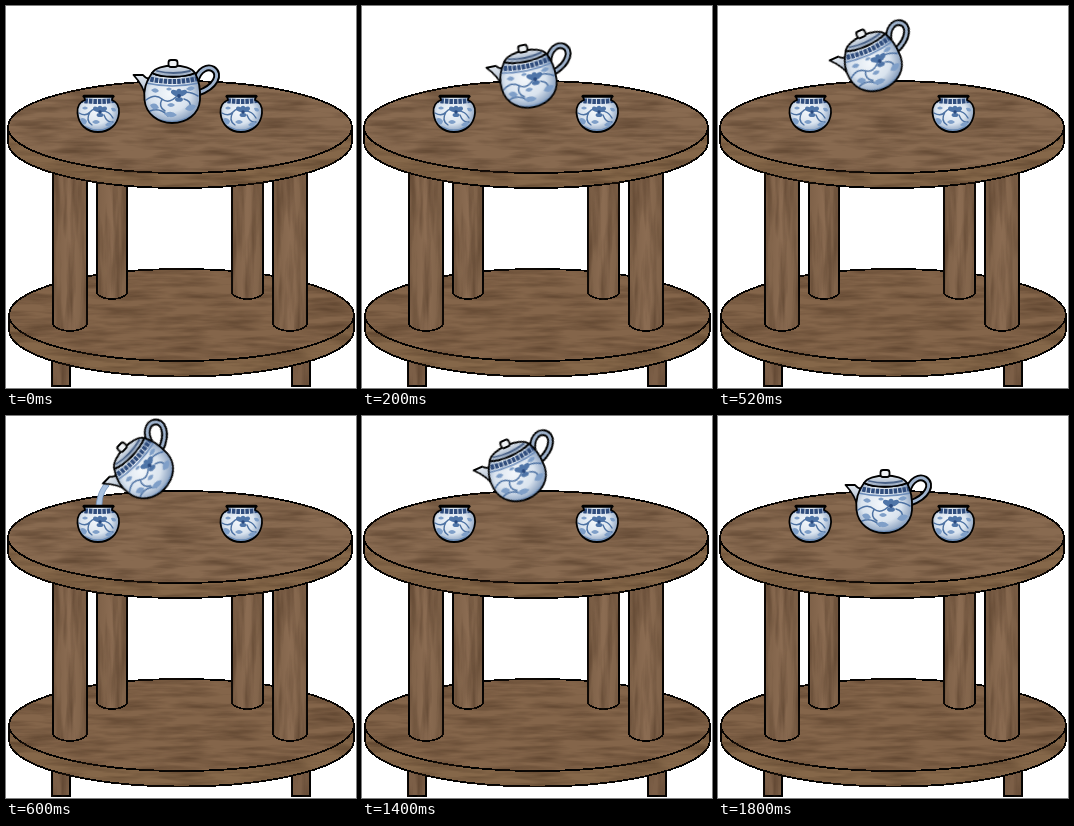
Recreate the animation shown at these times as an HTML page. Size 350x382 px, loop 2 s.

```html
<!DOCTYPE html>
<html lang="en">
<head>
<meta charset="utf-8">
<title>Tea table</title>
<style>
  html, body { margin: 0; width: 100%; height: 100%; overflow: hidden; background: #fff; }
  svg { display: block; width: 350px; height: 382px; }
  .ink { stroke: #000; stroke-width: 1.8; stroke-linejoin: round; stroke-linecap: round; }
  .wood { shape-rendering: crispEdges; }
  .line { fill: none; stroke-linecap: round; stroke-linejoin: round; }
  .band { fill: none; stroke: #2f4c7c; stroke-width: 5; stroke-dasharray: 3.5 1; }
  #pot { animation: pour 2s step-end infinite; }
  #stream { animation: flow 2s step-end infinite; }
  @keyframes pour {
    0%, 90%, 100% { transform: translate(166px, 90px); }
    10%, 80% { transform: translate(166.3px, 74.7px) rotate(-11.5deg); }
    20%, 70% { transform: translate(155.3px, 58px) rotate(-24deg); }
    30% { transform: translate(138.7px, 54.5px) rotate(-46deg); }
  }
  @keyframes flow {
    0%, 70%, 100% { visibility: hidden; }
    30% { visibility: visible; }
  }
</style>
</head>
<body>
<svg viewBox="0 0 350 382">
  <defs>
    <filter id="grainX" x="-.02" y="-.04" width="1.04" height="1.08" color-interpolation-filters="sRGB">
      <feTurbulence type="fractalNoise" baseFrequency=".02 .16" numOctaves="3" seed="4"/>
      <feColorMatrix values="0 0 0 0 .22  0 0 0 0 .14  0 0 0 0 .08  .9 0 0 0 -.34"/>
      <feComposite in2="SourceAlpha" operator="in" result="grain"/>
      <feMerge><feMergeNode in="SourceGraphic"/><feMergeNode in="grain"/></feMerge>
    </filter>
    <filter id="grainY" x="-.02" y="-.08" width="1.04" height="1.16" color-interpolation-filters="sRGB">
      <feTurbulence type="fractalNoise" baseFrequency=".13 .014" numOctaves="3" seed="9"/>
      <feColorMatrix values="0 0 0 0 .22  0 0 0 0 .14  0 0 0 0 .08  .9 0 0 0 -.34"/>
      <feComposite in2="SourceAlpha" operator="in" result="grain"/>
      <feMerge><feMergeNode in="SourceGraphic"/><feMergeNode in="grain"/></feMerge>
    </filter>
    <linearGradient id="leg">
      <stop offset="0" stop-color="#7e6148"/>
      <stop offset=".5" stop-color="#8b6c52"/>
      <stop offset="1" stop-color="#7e6148"/>
    </linearGradient>
    <radialGradient id="china" cx=".45" cy=".42" r=".6">
      <stop offset="0" stop-color="#f3f7fb"/>
      <stop offset=".6" stop-color="#d9e3ee"/>
      <stop offset="1" stop-color="#7f98ba"/>
    </radialGradient>
    <linearGradient id="glaze" x2="0" y2="1">
      <stop offset="0" stop-color="#e3e9f0"/>
      <stop offset="1" stop-color="#93a5bd"/>
    </linearGradient>

    <g id="flower">
      <g fill="#4f75a8">
        <ellipse cx="-4" cy="-1" rx="4" ry="2.3" transform="rotate(25)"/>
        <ellipse cx="4" cy="-1" rx="4" ry="2.3" transform="rotate(-25)"/>
        <ellipse cy="-3" rx="2.4" ry="3.3"/>
        <ellipse cy="3" rx="3.4" ry="2"/>
      </g>
      <circle r="1.7" fill="#28497f"/>
    </g>

    <path id="cupBody" d="M78 90 H107 L106 94 C111 96 113.5 101 113 107 C112 119 103 126 92 126 C81 126 72.500 119 71.500 107 C71 101 73.500 96 79 94 Z"/>
    <clipPath id="inCup"><use href="#cupBody"/></clipPath>
    <g id="cup">
      <use href="#cupBody" fill="url(#china)"/>
      <g clip-path="url(#inCup)">
        <path d="M74 94 Q92 97 111 94" class="band"/>
        <path d="M73 107 Q80 111 84 106 T94 105 Q103 104 107 112 M84 106 Q79 115 86 119 M98 109 Q101 117 107 116" class="line" stroke="#4d72a3" stroke-width="1.400"/>
        <path d="M74 113 q4 -3 7 2 q-1 5 -5 3 z M99 119 q4 -5 8 -2 q-3 6 -8 2 z M105 102 q5 -1 5 3 q-4 2 -5 -3 z M76 102 q3 -3 6 0 q-3 3 -6 0 z M86 116 q4 -4 8 0 q-4 4 -8 0 z" fill="#7f9fc8"/>
        <use href="#flower" x="94" y="106"/>
        <path d="M79 121 Q92 128 105 121" class="line" stroke="#6f8fb8" stroke-width="2.500"/>
      </g>
      <use href="#cupBody" class="ink" fill="none"/>
      <path d="M78 90.300 H107" class="ink" style="stroke-width:3"/>
    </g>

    <path id="potBody" d="M-20 -23 C-26 -15 -28.500 -5 -27.500 4 C-26 18 -14 27 0 27 C15 27 27 18 28 4 C28.500 -6 27 -16 23 -23 C12 -18 -10 -18 -20 -23 Z"/>
    <clipPath id="inPot"><use href="#potBody"/></clipPath>
    <path id="handle" d="M24 -15 C27 -27 36 -30 41 -27 C49 -22 44 -9 26 -3"/>
  </defs>

  <!-- feet and lower shelf -->
  <g class="ink wood" filter="url(#grainY)">
    <path d="M46 345 V380 H64 V350 Z M286 350 V380 H304 V345 Z" fill="#7c5f47"/>
  </g>
  <g class="ink wood" filter="url(#grainX)">
    <path d="M3 309 V324 A172.500 46.500 0 0 0 348 324 V309 Z" fill="#856749"/>
    <ellipse cx="175.500" cy="309" rx="172.500" ry="46" fill="#84654a"/>
  </g>

  <!-- legs -->
  <g class="ink wood" fill="url(#leg)" filter="url(#grainY)">
    <path d="M91 160 V286 A15 7 0 0 0 121 286 V160 Z"/>
    <path d="M226 160 V286 A15.500 7 0 0 0 257 286 V160 Z"/>
    <path d="M47 150 V317 A17 8 0 0 0 81 317 V150 Z"/>
    <path d="M267 150 V317 A17 8 0 0 0 301 317 V150 Z"/>
  </g>

  <!-- table top -->
  <g class="ink wood" filter="url(#grainX)">
    <path d="M2 121 V136 A172 46 0 0 0 346 136 V121 Z" fill="#856749"/>
    <ellipse cx="174" cy="121" rx="172" ry="46" fill="#886a50"/>
  </g>

  <path id="stream" d="M99 67 C94 73 91 80 90 90 H96 C96 82 98 75 103 70 Z" fill="#a9c2e0" stroke="#6f8fb8" stroke-width=".8"/>

  <use href="#cup"/>
  <use href="#cup" x="143"/>

  <g id="pot">
    <use href="#handle" class="line" stroke="#000" stroke-width="6.800"/>
    <use href="#handle" class="line" stroke="#9fb3cd" stroke-width="3"/>
    <path d="M-38.500 -21 L-29 -21 Q-25 -16 -20 -18 L-25.500 4 Q-28 -10 -38.500 -21 Z" class="ink" fill="url(#glaze)"/>
    <use href="#potBody" fill="url(#china)"/>
    <g clip-path="url(#inPot)">
      <path d="M-26 -18 Q0 -11 28 -18" class="band"/>
      <path d="M-26 -13 Q0 -7 27 -13" class="line" stroke="#6d8dba" stroke-width="1.300"/>
      <path d="M-26 4 Q-17 -3 -10 3 T6 -1 Q15 -7 26 0 M-10 3 Q-14 11 -7 15 M12 3 Q20 5 18 12 M-22 15 Q-12 11 -4 20" class="line" stroke="#4d72a3" stroke-width="1.500"/>
      <path d="M-21 -6 q5 -4 8 1 q-4 4 -8 -1 z M-22 9 q6 -4 9 3 q-6 4 -9 -3 z M13 13 q5 -7 11 -3 q-4 8 -11 3 z M14 -7 q5 -5 9 -1 q-4 5 -9 1 z M-8 18 q7 -5 13 1 q-7 5 -13 -1 z M-6 -7 q3 -3 6 0 q-3 3 -6 0 z M-5 9 q4 -4 8 0 q-4 4 -8 0 z" fill="#7f9fc8"/>
      <use href="#flower" transform="translate(7 0) scale(1.150)"/>
      <path d="M-20 21 Q0 32 21 20" class="line" stroke="#6f8fb8" stroke-width="3"/>
    </g>
    <use href="#potBody" class="ink" fill="none"/>
    <path d="M-20 -23 C-14 -33 17 -33 23 -23 C12 -18 -10 -18 -20 -23 Z" class="ink" fill="url(#glaze)"/>
    <path d="M-15 -25 Q1 -21 18 -25" class="line" stroke="#4a6287" stroke-width="1.800"/>
    <rect x="-3.500" y="-36" width="9" height="7" rx="2.500" class="ink" fill="#eef1f4"/>
  </g>
</svg>
</body>
</html>
```
